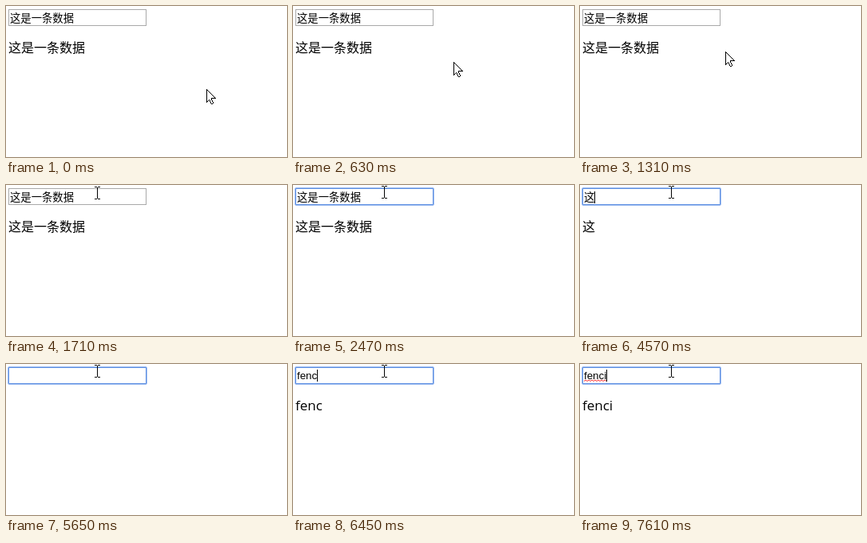
An HTML page for the animation above (8000 ms loop, 352 px wide and 189 px high).

```html
<!DOCTYPE html>
<html lang="zh-CN">
<head>
<meta charset="utf-8">
<title>Two-way binding</title>
<style>
html, body { margin: 0; width: 100%; height: 100%; overflow: hidden; background: #fff; }
svg { display: block; width: 352px; height: 189px; }
text { fill: #000; white-space: pre; }
.cjk { font-family: "Noto Sans CJK SC", "Noto Sans CJK", sans-serif; font-weight: 300; }
.field { font-size: 13.333px; }
.field.latin { font-family: "Liberation Sans", Arial, sans-serif; }
.copy { font-size: 16px; }
.copy.latin { font-family: "Open Sans", "Noto Sans", sans-serif; font-size: 17px; }
.crisp { shape-rendering: crispEdges; }
</style>
</head>
<body>
<svg viewBox="0 0 352 189">
  <rect id="box" x="3.5" y="4.5" width="172" height="20" fill="#fff"/>
  <rect id="ring" x="2.5" y="3.5" width="174" height="22" rx="1.5" fill="none" stroke="#9dbcf0"/>
  <text id="field" x="5"></text>
  <text id="copy" x="3" y="58"></text>
  <path id="squiggle" fill="none" stroke="#f33"/>
  <rect id="caret" class="crisp" width="1" height="15"/>
  <circle id="click" cx="112" cy="8" r="11" fill="none" stroke="#000"/>
  <path id="arrow" class="crisp" d="M.5 .5V16.5L3.5 13.5L6.5 18.5H7.5L8.5 17.5L6.5 12.5V11.5H11.5Z" fill="#fff" stroke="#000"/>
  <path id="beam" class="crisp" d="M-3 -8h3v1h1v-1h3v1h-3v14h3v1h-3v-1h-1v1h-3v-1h3v-14h-3z"/>
</svg>
<script>
const LOOP = 8000, STEP = 80, BLINK = 530;
const FOCUS = 2010, ERASE = 2890, TYPE = 5950, SPELLCHECK = 7600;
const FIRST = '这是一条数据', SECOND = 'fenci';
const KEY_GAP = 142, COPY_LAG = 60;

// pointer moves: start, end, x, y
const moves = [
  [50, 150, 245, 102],
  [230, 550, 189, 58],
  [550, 630, 201, 70],
  [1100, 1670, 114, 10],
  [FOCUS - STEP, FOCUS - STEP, 114, 9]
];

const $ = id => document.getElementById(id);
const show = (id, on) => $(id).setAttribute('visibility', on ? 'visible' : 'hidden');
const clamp = (v, lo, hi) => Math.min(hi, Math.max(lo, v));
const smooth = p => p * p * (3 - 2 * p);

// keys are pressed a little slower towards the end
const eraseTime = i => ERASE + 320 * i + 12 * i * i;

function erased(t) {
  let n = 0;
  while (n < FIRST.length && t >= eraseTime(n)) n++;
  return n;
}

const typed = t => clamp(Math.floor((t - TYPE) / KEY_GAP) + 1, 0, SECOND.length);

const textAt = t => t < TYPE
  ? FIRST.slice(0, FIRST.length - erased(t))
  : SECOND.slice(0, typed(t));

function setText(id, text) {
  const node = $(id);
  node.setAttribute('class', id + (FIRST.startsWith(text) ? ' cjk' : ' latin'));
  node.textContent = text;
  return node;
}

function pointerAt(t) {
  const now = Math.floor((t - 70) / STEP) * STEP + 70;
  let x = 251, y = 104;
  for (const [from, to, toX, toY] of moves) {
    if (now < from) break;
    const p = smooth(clamp((now - from) / (to - from || 1), 0, 1));
    x += (toX - x) * (to === from ? 1 : p);
    y += (toY - y) * (to === from ? 1 : p);
  }
  return [Math.round(x), Math.round(y)];
}

function caretVisible(t) {
  const since = t < TYPE ? FOCUS - 75 : TYPE + (typed(t) - 1) * KEY_GAP;
  return t >= FOCUS && Math.floor((t - since) / BLINK) % 2 === 0;
}

function render(t) {
  const text = textAt(t);
  const field = setText('field', text);
  setText('copy', textAt(t - COPY_LAG));

  const cjk = text !== '' && t < TYPE;
  field.setAttribute('y', cjk ? 20 : 19);
  $('caret').setAttribute('x', Math.round(5 + (text ? field.getComputedTextLength() : 0)));
  $('caret').setAttribute('y', cjk ? 8 : 7);
  show('caret', caretVisible(t));

  const focused = t >= FOCUS;
  $('box').setAttribute('stroke', focused ? '#5f90e2' : '#a9a9a9');
  show('ring', focused);
  show('click', focused && t < FOCUS + 2 * STEP);
  show('squiggle', t >= SPELLCHECK);

  const [x, y] = pointerAt(t);
  const overField = x < 176 && y < 25;
  for (const id of ['arrow', 'beam']) {
    $(id).setAttribute('transform', `translate(${x} ${y})`);
    show(id, overField === (id === 'beam'));
  }
}

$('squiggle').setAttribute('d', 'M5 21.5' + 'l2 -1.5l2 1.5'.repeat(7));

const start = performance.now();
function tick() {
  render((performance.now() - start) % LOOP);
  requestAnimationFrame(tick);
}
tick();
</script>
</body>
</html>
```
